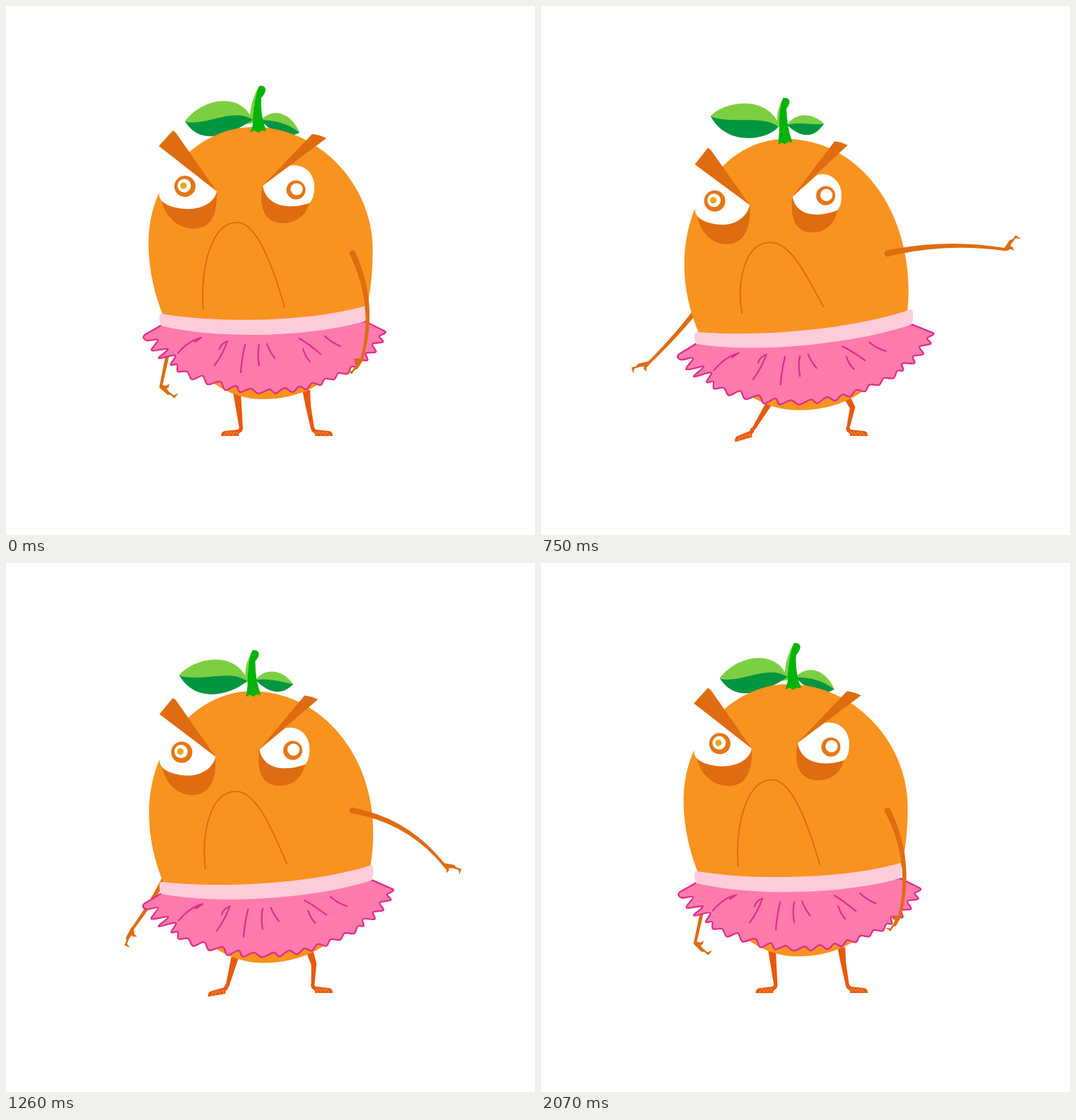
Write an HTML page that moves like this. It is 748 px wide and 748 px high and loops after 2100 ms.

```html
<!DOCTYPE html>
<html>
<head>
<meta charset="utf-8">
<style>
html, body { margin: 0; width: 100%; height: 100%; overflow: hidden; background: #fff }
svg { display: block; width: 100vw; height: 100vh }
</style>
</head>
<body>
<svg id="stage" viewBox="0 0 748 748"></svg>
<script>
const stage = document.getElementById('stage');
const ORANGE = '#f9931f', DARK = '#df6c11', LEG = '#e8590f', LIME = '#7dcf42',
      LEAF = '#00963f', STEM = '#00b30a', PINK = '#ff7bac', MAGENTA = '#e22d8a', BELT = '#ffccd9';

function add(tag, attrs, parent = stage) {
  const el = document.createElementNS('http://www.w3.org/2000/svg', tag);
  for (const k in attrs) el.setAttribute(k, attrs[k]);
  parent.append(el);
  return el;
}

const lerp = (a, b, p) => a + (b - a) * p;
const disc = (x, y, r) => `M${x - r} ${y} a${r} ${r} 0 1 0 ${2 * r} 0 a${r} ${r} 0 1 0 ${-2 * r} 0Z`;

// Paths that blend from the resting pose to the stretched pose
const morphs = [];
function morph(fill, from, to, extra) {
  const ends = to.match(/-?\d+(\.\d+)?/g);
  morphs.push({ el: add('path', { fill, ...extra }), from, ends });
}
function blend({ el, from, ends }, p) {
  let i = 0;
  // Whole numbers stay whole, as arc flags must be a bare 0 or 1
  el.setAttribute('d', from.replace(/-?\d+(\.\d+)?/g, n => +lerp(+n, +ends[i++], p).toFixed(2)));
}

function foot() {
  const g = add('g', {});
  add('path', { fill: LEG, d: 'M-2 -2 L2 -3 L5 1 L24 3 Q29 4 29 10 L4 10 L4 7 L-1 3Z' }, g);
  add('path', { fill: 'none', stroke: '#ffad5c', 'stroke-width': .8,
    d: 'M7 9Q8 6 5 4M13 9Q13 6 8 4M19 9Q18 6 13 4M24 9Q23 6 18 4' }, g);
  return g;
}

function arm() {
  const g = add('g', { fill: DARK });
  const limb = add('path', {}, g), hand = add('g', {}, g);
  add('path', { d: 'M-2 -2 L14 -5 L18 -3 L25 -4 L26 5 L22 -1 L13 0 L8 2 L10 4 L8 10 L6 5 L-1 2Z' }, hand);
  return { limb, hand };
}

// Tapered limb bowed sideways by `bend`, with a rotated hand at its end
function poseArm({ limb, hand }, x, y, wx, wy, bend, turn, flip) {
  const dx = wx - x, dy = wy - y, len = Math.hypot(dx, dy);
  const nx = dy / len, ny = -dx / len;
  const cx = (x + wx) / 2 + nx * bend * 2, cy = (y + wy) / 2 + ny * bend * 2;
  const at = (px, py, w) => `${px + nx * w} ${py + ny * w}`;
  limb.setAttribute('d', `M${at(x, y, 4.4)} Q${at(cx, cy, 3)} ${at(wx, wy, 2)}
    L${at(wx, wy, -2)} Q${at(cx, cy, -3)} ${at(x, y, -4.4)} A4.4 4.4 0 0 1 ${at(x, y, 4.4)}Z`);
  hand.setAttribute('transform', `translate(${wx} ${wy}) rotate(${turn}) scale(1 ${flip})`);
}

const leftArm = arm();

// Legs
morph(LEG, 'M321 546 L332 546 L335 598 L330 598Z', 'M316 568 L328 565 L291 600 L287 597Z');
morph(LEG, 'M419 543 L430 543 L431 565 L436 598 L431 598 L424 568Z',
           'M430 556 L440 556 L449 568 L436 598 L432 598 L441 569Z');
const leftFoot = foot();
foot().setAttribute('transform', 'translate(433 598)');

// Leaves
morph(LIME, 'M253 163 C275 133 325 121 345 154 Q346 135 357 114 L352 165 L340 167 L300 172Z',
            'M235 153 C255 135 310 129 330 165 Q329 150 337 137 L336 172 L326 174 L290 172Z');
morph(LEAF, 'M253 163 C280 172 320 142 349 161 C315 183 275 199 253 163Z',
            'M235 153 C265 167 310 157 331 174 C325 190 260 202 235 153Z');
morph(LIME, 'M360 162 C375 144 402 148 415 179 L385 172Z', 'M344 170 C353 154 375 150 395 162 L370 172Z');
morph(LEAF, 'M360 161 C380 162 398 165 415 179 C400 188 378 182 360 161Z',
            'M344 171 C358 163 375 171 395 162 C381 187 365 189 344 171Z');

// Body
morph(ORANGE,
  'M350 171 C440 171 518.5 250 518.5 345 C518.5 470 470 556 362 556 C270 556 201.5 440 201.5 335 C201.5 240 275 171 350 171Z',
  'M345 194 C445 194 520 290 520 425 C520 510 460 577 365 577 C270 577 203 475 203 375 C203 280 262 194 345 194Z');
morph(STEM, 'M358 113 Q366 112 367 118 Q367 123 361 130 Q359 152 368 177 L362 176 L357 179 L351 176 L345 179 Q350 170 349 160 Q351 130 358 113Z',
            'M337 136 Q345 135 346 141 Q346 146 342 150 Q344 180 351 198 L345 198 L341 201 L337 199 L332 202 Q333 180 333 160 Q334 140 337 136Z');

// Skirt: a smooth curve through the tips and notches of the ruffle
const skirt = add('g', {});
const ruffle = [222,450, 196,465, 199,473, 215,472, 206,487, 229,485, 216,498, 239,494, 233,507,
  242,507, 243,517, 256,517, 263,528, 278,523, 285,535, 303,531, 310,543, 325,537, 331,546, 346,541,
  357,548, 373,542, 381,548, 394,540, 405,546, 415,538, 425,542, 433,533, 445,536, 451,527, 464,528,
  470,519, 483,520, 488,510, 496,510, 495,500, 511,501, 509,491, 523,489, 518,478, 533,475, 528,467,
  536,460, 508,446];
const point = i => ruffle.slice(2 * i, 2 * i + 2);
let edge = `M${point(0)} L${point(1)}`;
for (let i = 1; i < ruffle.length / 2 - 2; i++) {
  const [a, b, c, d] = [i - 1, i, i + 1, i + 2].map(point);
  const lead = k => b[k] + (c[k] - a[k]) / 6, trail = k => c[k] - (d[k] - b[k]) / 6;
  edge += ` C${lead(0)} ${lead(1)} ${trail(0)} ${trail(1)} ${c}`;
}
add('path', { d: edge + ' L508 446Z', fill: PINK, stroke: MAGENTA, 'stroke-width': 2.3, 'stroke-linejoin': 'round' }, skirt);
add('path', { fill: 'none', stroke: MAGENTA, 'stroke-width': 2.2, 'stroke-linecap': 'round',
  d: `M276 469Q258 473 243 491M276 469L267 475M313 474Q304 477 302 485M313 474Q307 492 295 508
      M338 479Q333 500 332 518M358 479Q355 493 358 508M369 478Q372 487 380 498
      M415 470Q428 478 445 492M420 485Q424 497 430 503M451 467Q460 476 473 481` }, skirt);
add('path', { fill: BELT,
  d: 'M219 435Q216 437 217 445L219 452C300 472 430 468 507 446Q511 434 508 424C430 447 300 449 219 435Z' }, skirt);

// Eyes
morph(DARK, 'M220 274 C225 300 245 315 266 315 C290 314 299 295 298 262Z',
            'M221 304 C226 332 245 345 262 344.5 C285 344 297 322 294 289Z');
morph('#fff', 'M298 262 C295 280 272 288 255 287 C236 286 220 280 217 270 C213 245 218 225 235 212Z',
              'M294 288 C290 307 272 318 255 317 C238 316 222 310 219 300 C215 280 218 262 235 245Z');
morph(DARK, 'M363 252 C357 285 365 307 392 307 C408 307 424 298 429 278Z',
            'M353 273 C349 305 358 325 381 325 C398 325 412 314 416 292Z');
morph('#fff', 'M363 254 L400 226 C420 222 436 235 436 256 C436 270 432 277 428 279 C400 288 368 284 363 254Z',
              'M353 275 L388 243 C405 238 421 252 421 272 C421 284 418 290 415 293 C390 303 358 303 353 275Z');
const rings = [
  [253, 255, 243, 283, 15, '#e67616'], [252, 254, 242, 282, 9.5, '#fff'], [251, 254, 241, 282, 4.6, '#eca51c'],
  [410, 260, 400, 271, 13.5, '#e67616'], [411, 259, 401, 270, 8.6, '#fff']];
for (const [x, y, x2, y2, r, fill] of rings) morph(fill, disc(x, y, r), disc(x2, y2, r));

// Brows and mouth
morph(DARK, 'M236 176 L240 179 L298 262 L216 198Z', 'M236 209 L240 212 L294 288 L218 233Z');
morph(DARK, 'M433 181 Q443 182 453 187 L363 254Z', 'M409 195 Q418 196 427 200 L353 275Z');
morph('none', 'M278.5 429 C275 370 290 306 327 306 C355 306 378 370 394 426',
              'M286 436 C278 400 285 344 324 344 C352 344 375 385 401 425',
      { stroke: DARK, 'stroke-width': 2, 'stroke-linecap': 'round' });

const rightArm = arm();

function draw(now) {
  const t = Math.floor(now / 30) * 30 % 1050;
  // Rise for 450 ms, hold, then fall back the same way
  const x = Math.min(1, Math.min(t, 1050 - t) / 450);
  const p = x * x * (3 - 2 * x);

  morphs.forEach(m => blend(m, p));
  skirt.setAttribute('transform', `matrix(${1 + .077 * p} ${-.1 * p} 0 1 ${-16.5 * p} ${56.7 * p})`);
  leftFoot.setAttribute('transform', `translate(${lerp(333, 288, p)} ${598 + p}) rotate(${-22 * p}) scale(-1 1)`);
  poseArm(leftArm, 250, 389, lerp(219, 129, p), lerp(538, 493, p), 20 * p * (1 - p), lerp(32, 199, p), -1);

  const swing = p * (1.1 - .1 * p), stretch = Math.max(0, (p - .55) / .45);
  const angle = lerp(85, -29.4, swing) * Math.PI / 180, reach = 150 + 39 * stretch;
  poseArm(rightArm, 490, 350, 490 + reach * Math.cos(angle), 350 + reach * Math.sin(angle),
    14 * (1 - stretch), lerp(133, -101, swing), 1);
}

const start = performance.now();
function tick() {
  draw(performance.now() - start);
  requestAnimationFrame(tick);
}
tick();
</script>
</body>
</html>
```
